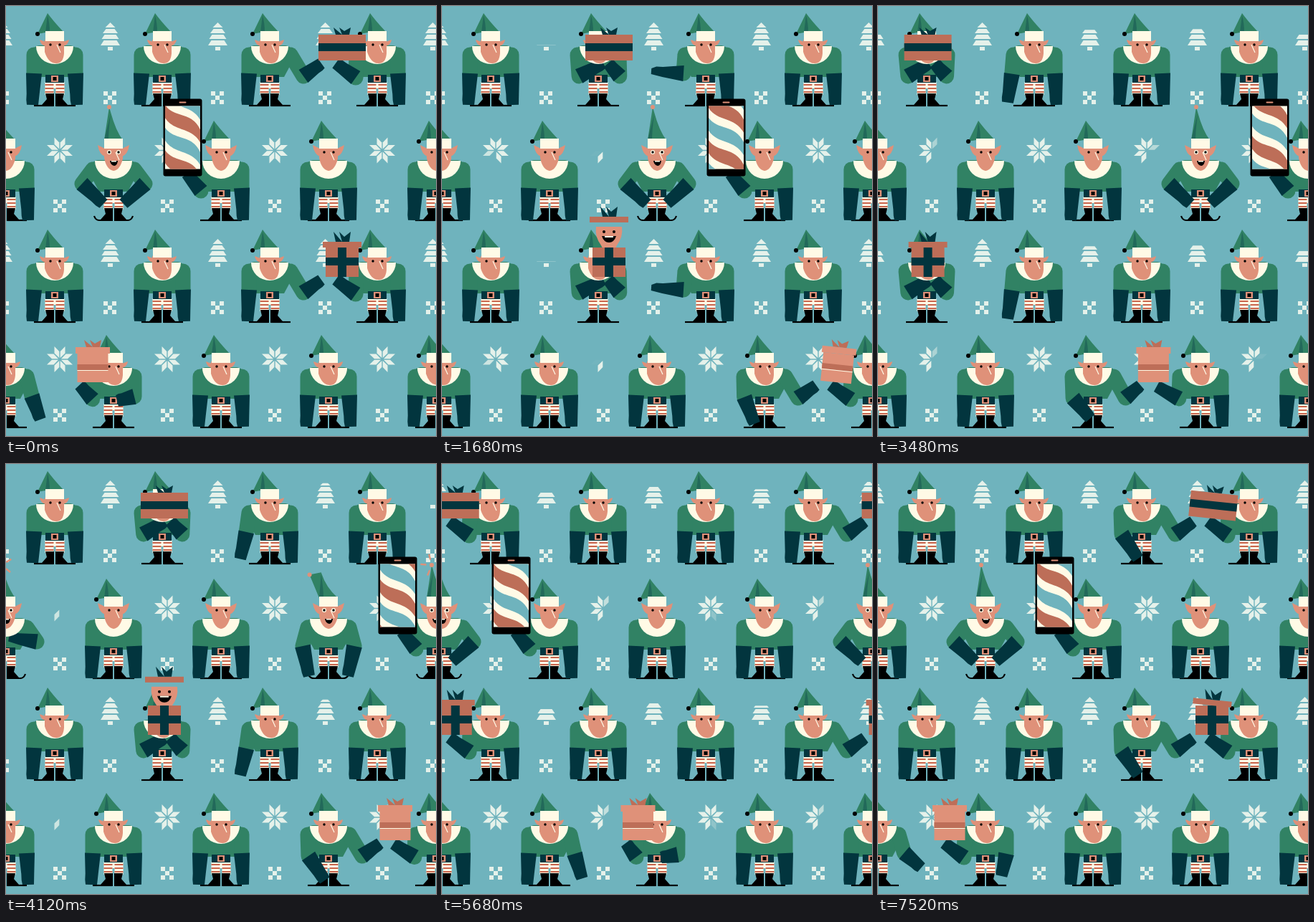
Animation, 600 px wide and 600 px high, one loop 7560 ms. Source, as an HTML page:

```html
<!DOCTYPE html>
<html lang="en">
<head>
<meta charset="utf-8">
<title>Elves</title>
<style>
  html, body { margin: 0; width: 100%; height: 100%; overflow: hidden; background: #6fb3bd; }
  svg { display: block; width: 100vw; height: 100vh; }
</style>
</head>
<body>
<svg id="stage" viewBox="0 0 600 600"></svg>
<script>
const LOOP = 7560, PASS = 630, TOSS = 1890;
const GREEN = '#318264', SHADE = '#22695a', NAVY = '#02353e', CREAM = '#fffae6',
      SKIN = '#df9179', BRICK = '#bd6e58', TEAL = '#6fb3bd', SNOW = '#e5f1ea', INK = '#000';
const stage = document.getElementById('stage');

const mod = (a, n) => ((a % n) + n) % n;
const clamp = v => Math.min(1, Math.max(0, v));
const shape = (d, fill, more = '') => `<path d="${d}" fill="${fill}" ${more}/>`;
const box = (x, y, w, h, fill, more = '') =>
  `<rect x="${x}" y="${y}" width="${w}" height="${h}" fill="${fill}" ${more}/>`;
const dot = (x, y, r, fill) => `<circle cx="${x}" cy="${y}" r="${r}" fill="${fill}"/>`;
const at = (x, y, body, turn = 0) => `<g transform="translate(${x} ${y}) rotate(${turn})">${body}</g>`;

// Keys are rows of [time, ...values]
function key(t, keys) {
  if (t <= keys[0][0]) return keys[0].slice(1);
  const i = keys.findIndex(k => k[0] > t);
  if (i < 0) return keys[keys.length - 1].slice(1);
  const a = keys[i - 1], b = keys[i], f = (t - a[0]) / (b[0] - a[0]);
  return a.slice(1).map((v, n) => v + (b[n + 1] - v) * f);
}

// Arm poses: elbow x, y, hand x, y
const DOWN_L = [-29, 94, -31, 138], DOWN_R = [29, 94, 31, 138];
const REACH = [-31, 94, -76, 91], SIDE = [-30, 100, -58, 80];
const FRONT_L = [-26, 98, 2, 80], FRONT_R = [27, 98, 10, 80];
const GIVE = [47, 98, 72, 80], FOLD = [-28, 98, -5, 132];

const PASS_LEFT = [
  [-315, ...DOWN_L], [-288, -33, 95, -42, 132], [-268, ...REACH], [-200, ...REACH],
  [-90, ...SIDE], [165, ...SIDE], [310, ...FRONT_L], [440, -27, 98, 8, 80],
  [530, ...FOLD], [600, ...FOLD], [630, ...DOWN_L]];
const PASS_RIGHT = [
  [130, ...DOWN_R], [190, 29, 96, 5, 102], [310, ...FRONT_R], [430, 30, 98, 14, 80],
  [530, ...GIVE], [640, ...GIVE], [730, 37, 92, 76, 97], [820, 36, 95, 48, 128], [890, ...DOWN_R]];

const LOW_L = [-29, 104, -31, 149], LOW_R = [29, 104, 31, 149];
const HOLD = [-28, 108, -48, 84], HIP_L = [-44, 98, -14, 126], HIP_R = [44, 98, 14, 126];
const RAISE = [34, 110, 40, 81];
const TOSS_LEFT = [
  [-700, ...LOW_L], [-660, -32, 104, -38, 146], [-470, ...HOLD], [1010, ...HOLD],
  [1220, -48, 82, -40, 42], [1440, ...HIP_L], [2120, ...HIP_L],
  [2230, -36, 104, -27, 146], [2330, ...LOW_L]];
const TOSS_RIGHT = [
  [180, ...LOW_R], [340, 43, 98, 4, 92], [560, ...RAISE], [1010, ...RAISE],
  [1220, 50, 76, 43, 121], [1440, ...HIP_R], [2120, ...HIP_R],
  [2230, 36, 104, 27, 146], [2330, ...LOW_R]];

function arm([ex, ey, hx, hy], side, low) {
  const len = Math.hypot(hx - ex, hy - ey) || 1;
  const nx = -(hy - ey) / len, ny = (hx - ex) / len;
  const thin = clamp((Math.abs(hx - ex) - 32) / 12);
  const wrist = 9 - 2 * thin, fist = 8 - 4 * thin;
  const p = (f, w) => `${ex + (hx - ex) * f + nx * w},${ey + (hy - ey) * f + ny * w}`;
  return `<path d="M${side * 29},${68 + low}L${ex},${ey}" stroke="${GREEN}" stroke-width="21" stroke-linecap="round"/>` +
    shape(`M${p(0, 11)}L${p(.65, wrist)}L${p(.85, wrist)}L${p(1, fist)}L${p(1, -fist)}L${p(.65, -wrist)}L${p(0, -11)}Z`, NAVY);
}

function legs(joy) {
  let out = box(-3, 106, 6, 9, CREAM);
  for (const s of [-1, 1]) {
    out += `<g transform="scale(${s} 1)">` + box(1.5, 106, 12, 18, CREAM);
    for (let y = 109; y < 123; y += 5) out += box(1.5, y, 12, 2, '#c9644c');
    const lift = 6 * joy;
    out += shape('M1 122H13L11 130L18 138L14 140H1Z', INK) +
      `<path d="M2 139H20Q${27 - joy * 2} 139 ${29 - joy * 2} ${139 - lift}" stroke="${INK}" stroke-width="2.2" fill="none"/></g>`;
  }
  return out;
}

function hat(joy) {
  const mix = (a, b) => a + (b - a) * joy;
  const bulge = 20 * Math.sin(Math.PI * joy);
  const tx = mix(-24, -6) - bulge, ty = mix(39, -9);
  const px = mix(-10, -4) - bulge * .3, py = mix(10, -2);
  return shape(`M-13 37L${tx} ${ty}L${px} ${py}Q${px + 7} ${py + mix(10, 26)} 13 37Z`, GREEN) +
    shape(`M-13 37L${px} ${py + 3}Q-7 24 -7 37Z`, SHADE) +
    dot(tx, ty, 3, joy > .4 ? SKIN : INK) + box(-13, 35, 26, 14, CREAM);
}

function face(joy, low) {
  const ears = low ? 'M-12 49L-22 44Q-20 57 -12 60ZM12 49L22 44Q20 57 12 60Z'
    : 'M-13 50L-21 47Q-20 54 -13 56ZM12 50L20 47Q19 54 12 56Z';
  const chin = low ? 'M-13 47H13V63Q9 79 0 80Q-10 78 -13 62Z' : 'M-14 47H13V66Q12 80 2 80Q-9 80 -14 64Z';
  let out = shape(ears, SKIN) + shape(chin, SKIN);
  if (joy > .3) out += dot(-6, 54, 3, CREAM) + dot(7, 54, 3, CREAM) +
    shape('M-5 66H6Q5 73 1 73Q-4 72 -5 66Z', INK) + box(-3, 66, 7, 1.5, CREAM);
  return out + dot(-6, 54, 1.7, INK) + dot(7, 54, 1.7, INK) +
    `<path d="M3 54L8 65" stroke="${CREAM}" stroke-width="1.2"/>`;
}

function elf(x, y, left, right, low = 0, joy = 0) {
  return at(x, y,
    at(0, low, legs(joy) +
      shape('M-22 55H22Q34 57 34 73L20 99H-20L-34 73Q-34 57 -22 55Z', GREEN) +
      box(-13, 96, 26, 11, NAVY) + box(-5, 97, 10, 9, SKIN) + box(-2.5, 99, 5, 5, INK)) +
    arm(left, -1, low) + arm(right, 1, low) +
    shape(`M-26 ${56 + low}A26 25 0 0 0 26 ${56 + low}Z`, CREAM) +
    face(joy, low) + hat(joy));
}

const bow = (fill, y, tall = 10) =>
  shape(`M0 ${y}L-12 ${y - tall}L-9 ${y}ZM0 ${y}L-4 ${y - tall}L3 ${y - tall / 2}L12 ${y - tall}L10 ${y}Z`, fill);

const wideGift = (time, tilt) => at(0, 0, bow(NAVY, -36) + box(-33, -36, 66, 36, BRICK) +
  box(-33, -24, 66, 11, NAVY), tilt);

// Only the lid tilts; a jack lifts it
function jackGift(time, tilt) {
  const [open] = key(time, [[1260, 0], [1350, .8], [1600, .92], [1680, 1], [1800, 1], [1890, 0]]);
  let out = '';
  if (open > 0) {
    const top = -41 - 33 * open;
    out += shape(`M-18 ${top + 4}H18Q20 ${top + 18} 11 ${top + 30}L9 -40H-9L-11 ${top + 30}Q-20 ${top + 18} -18 ${top + 4}Z`, SKIN) +
      dot(-7, top + 11, 2, INK) + dot(7, top + 11, 2, INK) +
      shape(`M-10 ${top + 17}H10Q7 ${top + 26} 0 ${top + 26}T-10 ${top + 17}Z`, INK) +
      box(-6, top + 17, 12, 2, CREAM);
  }
  const lid = box(-27, -8, 54, 8, BRICK) + bow(NAVY, -8, 14);
  return out + box(-23, -41, 46, 41, BRICK) + box(-6, -41, 12, 41, NAVY) +
    box(-23, -27, 46, 11, NAVY) + at(0, -41 - 35 * open, lid, tilt);
}

const smallGift = (time, tilt) => at(0, 0, bow(BRICK, -49) + box(-24, -49, 48, 9, SKIN) +
  box(-21.5, -40, 43, 40, SKIN) + box(-21.5, -25, 43, 8, BRICK) + box(-21.5, -17, 43, 1, CREAM), tilt);

const GIFT_X = [[0, -49], [100, -52], [150, -50], [190, -29], [290, -4], [340, 3], [360, 8],
  [420, 15], [450, 24], [530, 93], [550, 96], [590, 98], [630, 101]];
const GIFT_TURN = [[0, 0], [530, 0], [550, 4], [580, 6], [610, 6], [630, 0]];

function passingRow(t, x0, y, delay, holder, gift) {
  const time = (t + delay) % (PASS * 4), step = Math.floor(time / PASS), p = time % PASS;
  let out = '';
  for (let i = -1; i < 6; i++) {
    const turn = mod(i - holder, 4) * PASS;
    const local = mod(time - turn + 700, PASS * 4) - 700;
    out += elf(x0 + i * 150, y, key(local, PASS_LEFT), key(local, PASS_RIGHT));
  }
  const x = mod(x0 + (holder + step) * 150 + key(p, GIFT_X)[0], 600);
  const [tilt] = key(p, GIFT_TURN);
  for (const wrap of [-600, 0, 600]) out += at(x + wrap, y + 76, gift(time, tilt));
  return out;
}

function phone(t) {
  let stripes = '';
  const shift = (t / 945 * 63) % 63;
  for (let i = -3; i < 5; i++) for (const [gap, color] of [[0, BRICK], [31.5, TEAL]]) {
    const y = -46 + i * 63 + gap + shift;
    stripes += shape(`M-25 ${y}C-12 ${y + 20} 12 ${y + 8} 25 ${y + 36}V${y + 54}C12 ${y + 30} -12 ${y + 39} -25 ${y + 18}Z`, color);
  }
  return box(-27, -54, 54, 108, INK, 'rx="3"') + box(-24.5, -44, 49, 88, CREAM) +
    `<g clip-path="url(#screen)">${stripes}</g>` + box(-5, -50, 10, 2, SKIN, 'rx="1"');
}

function sparkles(phase) {
  let out = '';
  const burst = (cx, cy, from, to, reach, count) => {
    const f = (phase - from) / (to - from);
    if (f <= 0 || f >= 1) return;
    for (let k = 0; k < count; k++)
      out += at(cx, cy, box(reach * (.4 + f * .6), -1.2, 8 * (1 - f) + 1, 2.4, SKIN), k * 360 / count + 40);
  };
  burst(-6, -9, 270, 800, 16, 5);
  burst(0, 112, 560, 1030, 30, 8);
  return out;
}

function tossingRow(t) {
  const y = 150, step = Math.floor(t / TOSS), phase = t % TOSS;
  let out = '';
  for (let i = -1; i < 6; i++) {
    const local = mod(t - mod(i - 2, 4) * TOSS + 800, LOOP) - 800;
    const [joy] = key(local, [[180, 0], [310, 1], [2170, 1], [2230, .72], [2340, 0]]);
    out += elf(i * 150, y, key(local, TOSS_LEFT), key(local, TOSS_RIGHT), 10, joy);
    if (local > 0 && local < 1100) out += at(i * 150, y, sparkles(local));
  }
  const [f] = key(phase, [[1010, 0], [1090, .14], [1220, .56], [1330, .87], [1430, 1]]);
  const x = mod((2 + step) * 150 - 53.5 + f * 150, 600);
  const arc = Math.sin(Math.PI * f);
  for (const wrap of [-600, 0, 600]) out += at(x + wrap, 183.5 - 51 * arc, phone(t), 31 * arc);
  return out;
}

// Visible share per column; above 1 the sweep erases from its start
const TIMES = [900, 1680, 2880, 4120, 5000, 6400, 7200];
const GROWTH = [
  [1, 1, 1, .15, .85, 1, 1], [1, 1.15, 1, .1, 1, 1, 1],
  [1, .18, 1, 1, .12, 1, 1], [1, .13, 1, 1, .2, 1, 1],
  [1, 1, .45, 1, .78, .78, 1], [1, 1, .42, 1, 1.25, .55, 1],
  [1, 1, .62, .88, 1, .32, 1], [1, 1, .3, 1, 1, .14, 1]];
const growth = (column, t) => key(t, TIMES.map((time, i) => [time, GROWTH[mod(column, 8)][i]]))[0];

function tree(x, y, share) {
  const height = Math.max(.1, 40 * share), top = 62 - height;
  return at(x, y, `<svg x="-15" y="${top}" width="30" height="${height}" viewBox="-15 ${top} 30 ${height}">` +
    shape('M0 23L7 30H-7ZM-6 32H6L10.5 38H-10.5ZM-8 40H8L12 46H-12ZM-9 48H9L13.5 55H-13.5ZM-3.5 57H3.5V62H-3.5Z', SNOW) + '</svg>');
}

// Petals appear clockwise from the bottom
function flake(x, y, share) {
  const petal = shape('M.7 -2V-11L7.5 -18V-8.5Z', SNOW);
  let out = '';
  for (let k = 0; k < 8; k++) {
    const visible = clamp(share <= 1 ? share * 8 - k : k + 1 - (share - 1) * 8);
    if (!visible) continue;
    const quarter = Math.floor((k + 1) / 2) * 90 + 180;
    out += `<g transform="rotate(${quarter}) scale(${k % 2 ? -1 : 1} 1)" opacity="${visible}">${petal}</g>`;
  }
  return at(x, y, out);
}

const cross = (x, y) => at(x, y,
  box(-3, -3, 6, 6, SNOW) + [[-9, -9], [3, -9], [-9, 3], [3, 3]].map(([a, b]) => box(a, b, 6, 6, SNOW)).join(''));

function backdrop(t) {
  let out = '';
  for (let i = 0; i < 5; i++) {
    const odd = -5 + i * 150, even = 75 + i * 150;
    for (const y of [0, 302]) out += tree(odd + .5, y, growth(i * 2, t));
    for (const y of [201.5, 493]) out += flake(even, y, growth(i * 2 + 1, t));
    out += cross(odd, 128) + cross(even, 279) + cross(odd, 421) + cross(even, 571);
  }
  return out;
}

function draw(now) {
  const t = Math.floor((now % LOOP) / 40) * 40;
  stage.innerHTML = '<clipPath id="screen"><rect x="-24.5" y="-44" width="49" height="88"/></clipPath>' +
    box(0, 0, 600, 600, TEAL) + backdrop(t) +
    passingRow(t, 68, 0, 0, 3, wideGift) +
    passingRow(t, 68, 302, 0, 3, jackGift) +
    passingRow(t, 0, 449, 190, 1, smallGift) +
    tossingRow(t);
}

let start;
function tick(now) {
  start ??= now;
  draw(now - start);
  requestAnimationFrame(tick);
}
draw(0);
requestAnimationFrame(tick);
</script>
</body>
</html>
```
